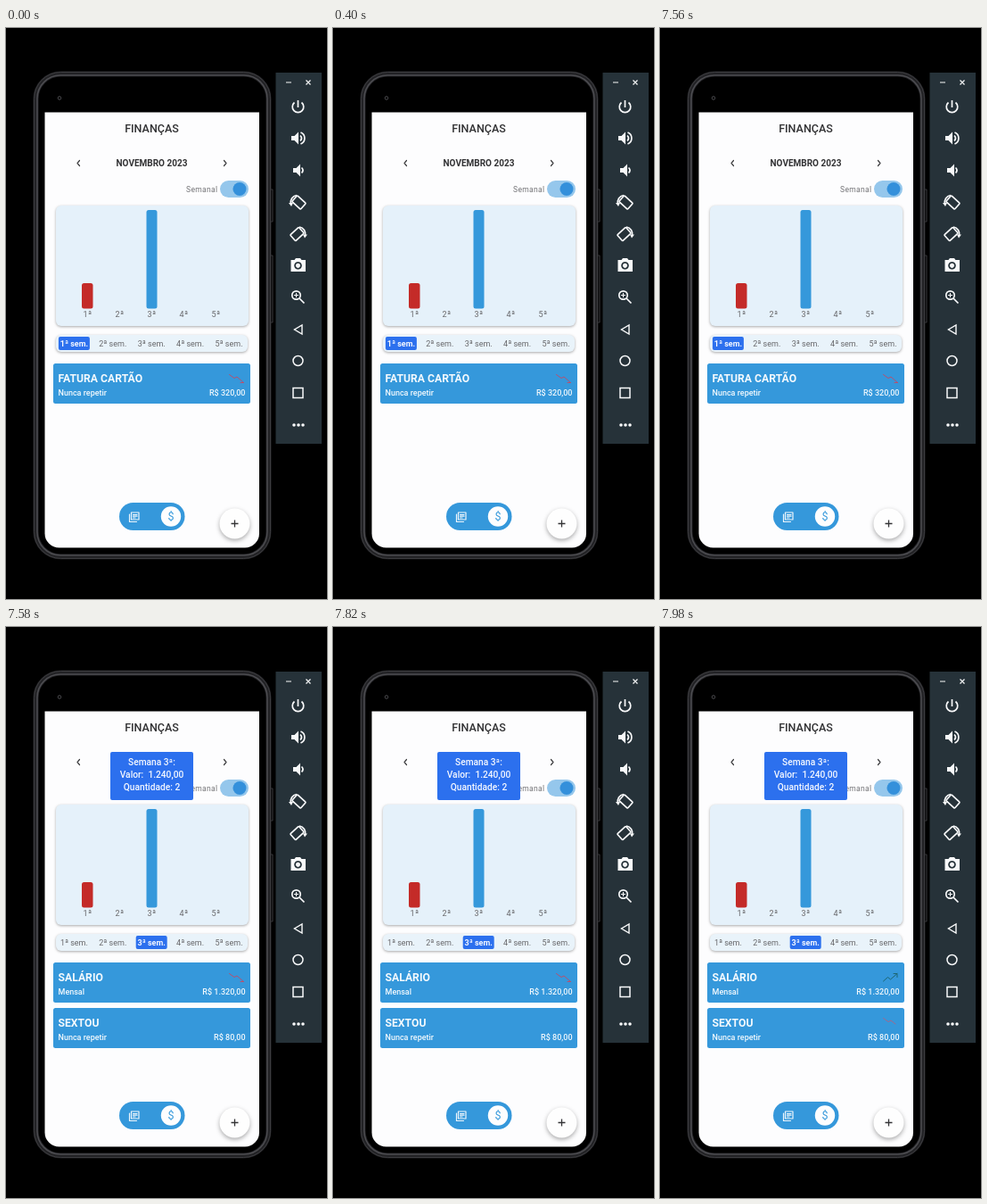
These frames come from a looping animation (360 by 640 pixels, 8 s). An HTML page:

```html
<!DOCTYPE html>
<html lang="pt">
<head>
<meta charset="utf-8">
<title>Finanças</title>
<style>
  html, body { margin: 0; width: 100%; height: 100%; overflow: hidden; background: #000; }
  svg { display: block; width: 360px; height: 640px; font: 500 9px Roboto, sans-serif; }
  .mid { text-anchor: middle; }
  .end { text-anchor: end; }
  .line { fill: none; stroke-linecap: round; stroke-linejoin: round; }
  .tools { fill: none; stroke: #f8f9fa; stroke-width: 1.7; }
  .tools .solid { fill: #f8f9fa; stroke: none; }
  .soft { filter: drop-shadow(0 1px 1.5px #0005); }
</style>
</head>
<body>
<svg viewBox="0 0 360 640">
  <rect width="360" height="640"/>

  <!-- phone body -->
  <g fill="none">
    <path d="M297 181h2v36h-2M297 255h2v75h-2" stroke="#3c3c40"/>
    <rect x="33.500" y="51.500" width="261" height="541" rx="28" stroke="#222225" stroke-width="6"/>
    <rect x="31.500" y="49.500" width="265" height="545" rx="30" stroke="#3d3d40"/>
    <rect x="35" y="53" width="258" height="538" rx="26" stroke="#4c4c50" stroke-width="1.500"/>
  </g>
  <g fill="none" stroke="#4c4c50"><circle cx="60" cy="78.500" r="1.800"/></g>
  <path d="M43.500 94.500h240.500v472a16 16 0 0 1-16 16H59.500a16 16 0 0 1-16-16z" fill="#fdfdfe"/>

  <!-- header -->
  <g class="mid" fill="#333335">
    <text x="163.500" y="117" font-size="12.500">FINANÇAS</text>
    <text x="163.500" y="155" font-size="10" font-weight="700">NOVEMBRO 2023</text>
  </g>
  <path class="line" d="M82.500 148.500l-2.500 3 2.500 3M244.500 148.500l2.500 3-2.500 3" stroke="#3c3c3e" stroke-width="1.200"/>
  <text x="202" y="184" fill="#737376" font-size="8.500" letter-spacing=".35" font-weight="400">Semanal</text>
  <rect x="240" y="171" width="32" height="19" rx="9.500" fill="#95c7ec"/>
  <circle cx="262" cy="180.500" r="7.500" fill="#3490db"/>

  <!-- chart -->
  <rect class="soft" x="56" y="199" width="216" height="135" rx="6" fill="#e5f1fa"/>
  <rect x="85" y="286" width="12.500" height="28.500" rx="2.500" fill="#c42b28"/>
  <rect x="157.500" y="204" width="12" height="110.500" rx="2.500" fill="#3598db"/>
  <g id="axis" class="mid" fill="#68686b" font-weight="400" letter-spacing=".4"></g>

  <rect class="soft" x="56" y="344" width="215" height="19" rx="6" fill="#e9f3fa"/>
  <rect id="selection" y="346" width="35" height="15" rx="2" fill="#2c70ee"/>
  <g id="tabs" class="mid"></g>

  <g id="before"></g>
  <g id="after">
    <rect x="117" y="140" width="93" height="54" rx="2" fill="#2c70ee"/>
    <g class="mid" fill="#f5f8ff" font-size="10.200">
      <text x="163.500" y="155">Semana 3ª:</text>
      <text x="163.500" y="169" xml:space="preserve">Valor:  1.240,00</text>
      <text x="163.500" y="183">Quantidade: 2</text>
    </g>
  </g>
  <g class="line">
    <path id="fall" d="M250.500 388.500l5.500 4 3-1.500 7.500 6.500M263 397.500h3.500" stroke="#b7506f"/>
    <path id="rise" d="M250.500 397l5-4.500 3 2.500 7.500-6.500M262 388.500h4v4" stroke="#1d6672"/>
    <path id="fallSecond" d="M250.500 438.500l5.500 4 3-1.500 5 4" stroke="#a2688d"/>
  </g>

  <!-- bottom controls -->
  <rect x="127" y="532" width="73.500" height="31" rx="15.500" fill="#3598db"/>
  <circle cx="185" cy="547.500" r="11.200" fill="#fdfdfe"/>
  <text class="mid" x="185" y="552" fill="#3598db" font-size="12.500" font-weight="400">$</text>
  <path class="line" d="M140.500 543h8.500v8h-8.500zM138.500 545v8.500h8M142.500 545.500h4.500M142.500 547.200h4.500M142.500 549h2.500" stroke="#eef6fc" stroke-width="1.200"/>
  <circle cx="256.500" cy="555.500" r="17" fill="#fefefe" style="filter:drop-shadow(0 2px 2.500px #0005)"/>
  <path d="M252.500 555.500h8M256.500 551.500v8" stroke="#333335" stroke-width="1.300"/>

  <!-- emulator toolbar -->
  <rect x="302.500" y="50" width="51.500" height="416" fill="#263239"/>
  <g class="tools">
    <path d="M314 61h6M336.500 58.500l5 5M341.500 58.500l-5 5" stroke-width="1.200"/>
    <path d="M327.500 81v8M323.500 83.500a6.300 6.300 0 1 0 8 0"/>
    <path class="solid" d="M320 121h3.500l4.500-4.500v14l-4.500-4.500H320zM322 157h3.500l4.500-4.500v14l-4.500-4.500H322z"/>
    <path d="M330 120.500q3 3 0 6M330.500 117a7 7 0 0 1 0 13M331.500 156.500q3 3 0 6"/>
    <g id="rotate">
      <rect x="-6.500" y="-4.500" width="13" height="9" rx="1" transform="translate(1 .5) rotate(42)"/>
      <path d="M-8 2.500a8 8 0 0 1 6.500-10" stroke-width="1.700"/>
      <path class="solid" d="M-10.500 1h5l-2 4z"/>
    </g>
    <path class="solid" fill-rule="evenodd" d="M319.500 260h4l1.500-2h5l1.500 2h4.500v13h-16.500zM327.500 262a4.300 4.300 0 1 0 .01 0zM327.500 263.700a2.600 2.600 0 1 1-.01 0z"/>
    <circle cx="325.500" cy="299.500" r="4.700"/>
    <path d="M329 303l5.500 5.500"/><path d="M323 299.500h5M325.500 297v5" stroke-width="1.100"/>
    <path d="M332 333v10l-8.500-5z" stroke-width="1.400"/>
    <circle cx="327.500" cy="373" r="5.500" stroke-width="1.500"/>
    <rect x="322" y="403.500" width="11" height="11" stroke-width="1.500"/>
    <path d="M323 445h.01M328 445h.01M333 445h.01" stroke-width="3.600" stroke-linecap="round"/>
  </g>
</svg>
<script>
  const LOOP = 8000, TAP = 7580, ICONS_START = 7840, ICONS_END = 7980;
  const el = id => document.getElementById(id);
  const weeks = [1, 2, 3, 4, 5];

  const card = (y, title, repeat, value) => `
    <rect x="53" y="${y}" width="221" height="45" rx="2.5" fill="#3598db"/>
    <g fill="#f3f9fd">
      <text x="58.5" y="${y + 21}" font-size="12.2" font-weight="700">${title}</text>
      <text x="58.5" y="${y + 36}">${repeat}</text>
      <text class="end" x="268.5" y="${y + 36}">${value}</text>
    </g>`;

  el('axis').innerHTML = weeks.map(n => `<text x="${55.5 + 36 * n}" y="324">${n}ª</text>`).join('');
  el('tabs').innerHTML = weeks.map(n => `<text x="${33 + 43.4 * n}" y="357">${n}ª sem.</text>`).join('');
  el('before').innerHTML = card(376, 'FATURA CARTÃO', 'Nunca repetir', 'R$ 320,00');
  el('after').innerHTML += card(376, 'SALÁRIO', 'Mensal', 'R$ 1.320,00')
    + card(427, 'SEXTOU', 'Nunca repetir', 'R$ 80,00');

  const rotate = el('rotate');
  const mirrored = rotate.cloneNode(true);
  mirrored.removeAttribute('id');
  rotate.setAttribute('transform', 'translate(327.5 195)');
  mirrored.setAttribute('transform', 'translate(327.5 230.5) scale(-1 1)');
  rotate.after(mirrored);

  const show = (id, on) => el(id).style.display = on ? '' : 'none';

  function draw() {
    const time = performance.now() % LOOP;
    const tapped = time >= TAP;
    const selected = tapped ? 3 : 1;
    const reveal = Math.max(0, Math.min(1, (time - ICONS_START) / (ICONS_END - ICONS_START)));

    show('before', !tapped);
    show('after', tapped);
    el('selection').setAttribute('x', 15.5 + 43.4 * selected);
    [...el('tabs').children].forEach((tab, i) => {
      const active = i + 1 === selected;
      tab.setAttribute('fill', active ? '#f5f8ff' : '#68686b');
      tab.setAttribute('font-weight', active ? 700 : 400);
    });
    el('fall').style.opacity = 1 - reveal;
    el('rise').style.opacity = reveal;
    el('fallSecond').style.opacity = reveal;
    requestAnimationFrame(draw);
  }
  draw();
</script>
</body>
</html>
```
